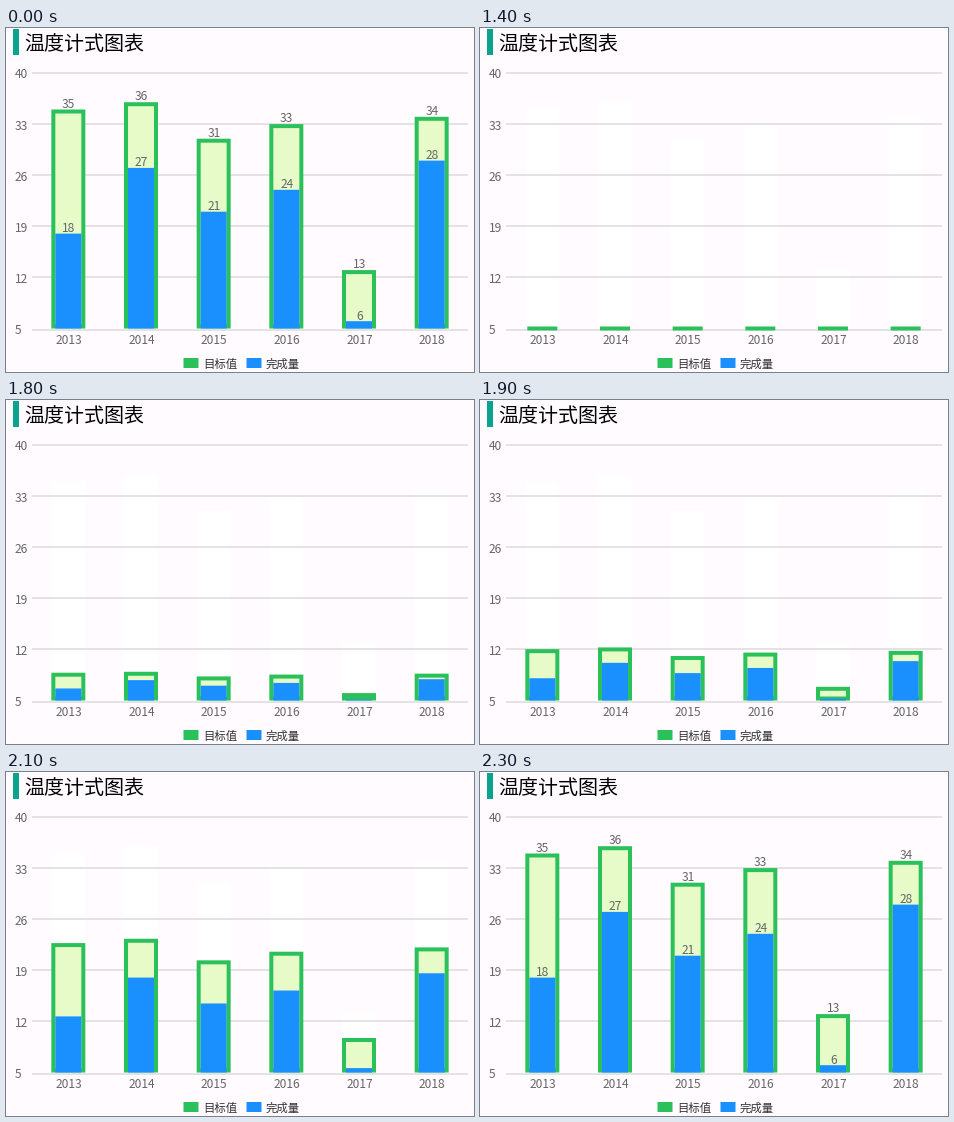
A matplotlib script for the animation above (3.2 s loop, 468x344 px).

```python
import matplotlib.pyplot as plt
from matplotlib.animation import FuncAnimation
from matplotlib.patches import Rectangle

W, H, DPI = 468, 344, 100
STEP, LOOP = 100, 3200
PX = 72 / DPI  # points per pixel

YEARS = range(2013, 2019)
TARGET = [35, 36, 31, 33, 13, 34]
DONE = [18, 27, 21, 24, 6, 28]

BG, GREEN, PALE, BLUE = "#fffbff", "#2bc15a", "#e6fbc8", "#1a90ff"
LEFT, RIGHT, BASE, AXIS = 26, 462, 300.5, 302
UNIT = 7.3
BAR, BORDER = 34, 4
SLOT = (RIGHT - LEFT) / len(TARGET)

CLEAR_AT, GROW_AT, DONE_AT = 1200, 1400, 2300

plt.rcParams["font.family"] = ["Noto Sans CJK JP", "DejaVu Sans"]
plt.rcParams["path.snap"] = False
fig = plt.figure(figsize=(W / DPI, H / DPI), dpi=DPI, facecolor=BG)
ax = fig.add_axes([0, 0, 1, 1])
ax.set_xlim(0, W)
ax.set_ylim(H, 0)
ax.axis("off")


def box(x, y, w, h, color, z=3):
    return ax.add_patch(Rectangle((x, y), w, h, fc=color, lw=0, zorder=z))


def label(x, y, text, size=12, color="#666666", ha="left"):
    return ax.text(x, y, text, size=size * PX, color=color, ha=ha,
                   va="baseline", zorder=6)


def height(value):
    return (value - 5) * UNIT


def ease_in_out(t):
    return 4 * t ** 3 if t < 0.5 else 1 - 4 * (1 - t) ** 3


# Heading
box(7, 1, 6, 26, "#0aa390")
label(18.3, 22.5, "温度计式图表", 20, "black")

# Axes and legend
chart = []
for tick in range(5, 41, 7):
    level = BASE - height(tick)
    y = AXIS if tick == 5 else round(level)
    chart += ax.plot([LEFT, RIGHT], [y, y], color="#e4e2e5", lw=2 * PX,
                     solid_capstyle="butt", zorder=2)
    chart.append(label(8.6, level + 5.4, str(tick)))
for x, name, color in [(177.5, "目标值", GREEN), (240.5, "完成量", BLUE)]:
    chart.append(box(x, 330, 15, 10, color))
    chart.append(label(x + 19.5, 340, name, 11.4, "#333333"))

# Bars
traces, outer, inner, values = [], [], [], []
for i, (year, target, done) in enumerate(zip(YEARS, TARGET, DONE)):
    mid = LEFT + SLOT * (i + 0.5)
    x = mid - BAR / 2
    chart.append(label(mid + 0.5, 316, str(year), ha="center"))
    traces.append(box(x, BASE - height(target), BAR, height(target), "white", 1))
    outer.append(ax.add_patch(Rectangle((x + BORDER / 2, BASE), BAR - BORDER, 0,
                                        fc=PALE, ec=GREEN, lw=BORDER * PX, zorder=4)))
    inner.append(box(x + BORDER, BASE, BAR - 2 * BORDER, 0, BLUE, 5))
    for v in (target, done):
        values.append(label(mid + 0.3, BASE - height(v) - 1.7, str(v), ha="center"))


def set_bars(progress):
    for rim, core, target, done in zip(outer, inner, TARGET, DONE):
        h = height(target) * progress
        inset = min(BORDER, h)
        rim.set_y(BASE - h + inset / 2)
        rim.set_height(h - inset)
        rim.set_joinstyle("miter" if h > BORDER else "round")
        h = height(done) * progress
        core.set_y(BASE - h)
        core.set_height(h)


def update(frame):
    ms = frame * STEP
    blank = CLEAR_AT <= ms < GROW_AT
    full = ms < CLEAR_AT or ms >= DONE_AT
    for artist in chart + outer + inner:
        artist.set_visible(not blank)
    for artist in values:
        artist.set_visible(full)
    for artist in traces:
        artist.set_visible(not full)
    if not blank:
        set_bars(1 if full else ease_in_out((ms - 1360) / 1390))
    return []


anim = FuncAnimation(fig, update, frames=LOOP // STEP, interval=STEP,
                     repeat=True, repeat_delay=0, blit=False)
plt.show()
```
